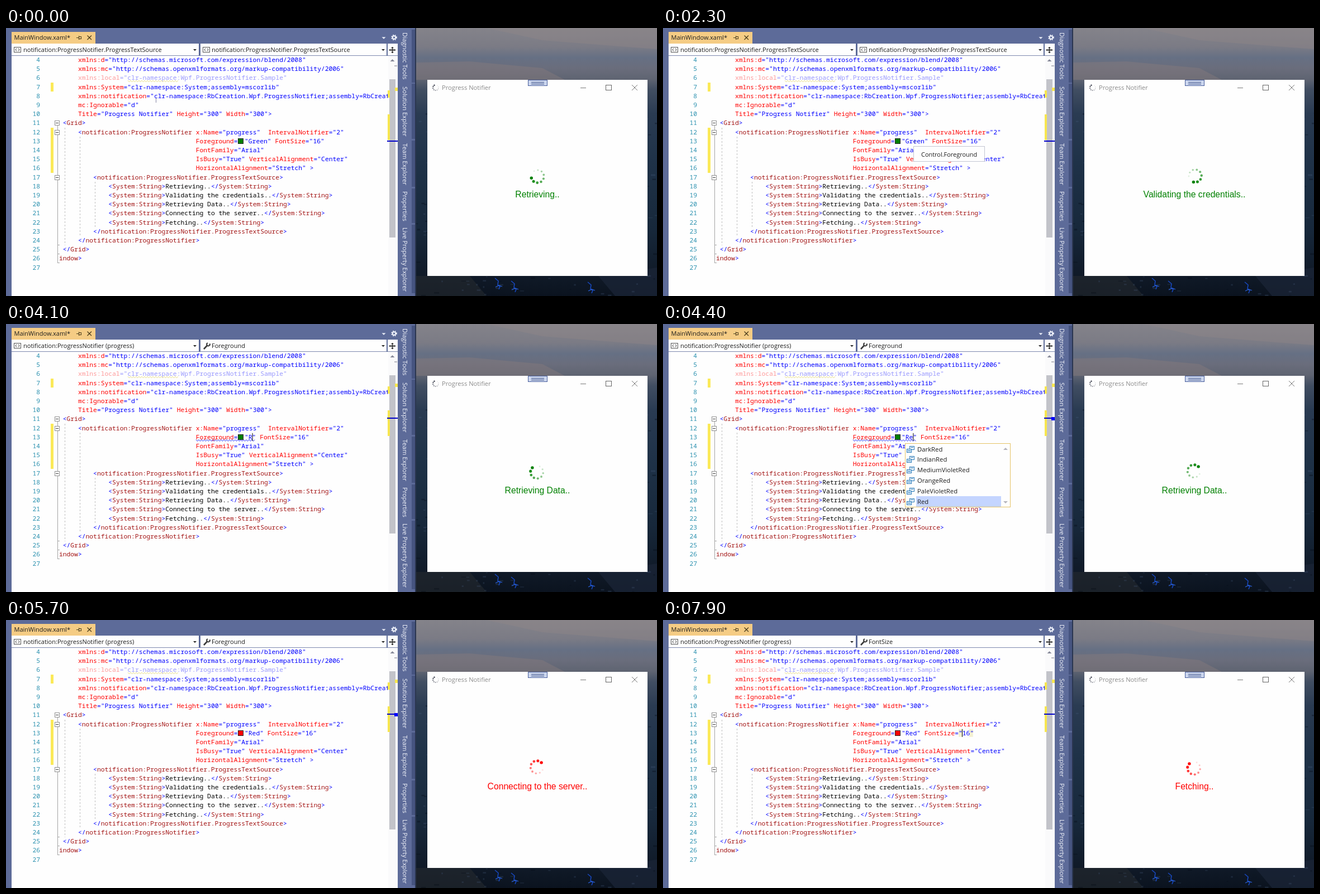
These frames come from a looping animation (1165x481 px, 8000 ms). An HTML page with a canvas:

```html
<!DOCTYPE html>
<html lang="en">
<head>
<meta charset="utf-8">
<title>Progress Notifier</title>
<style>
html, body { margin: 0; width: 100%; height: 100%; overflow: hidden; background: #5d6b99; }
canvas { display: block; width: 100vw; height: 100vh; }
</style>
</head>
<body>
<canvas id="stage"></canvas>
<script>
const W = 1165, H = 481, LOOP = 8000, TICK = 100;
const canvas = document.getElementById('stage');
const g = canvas.getContext('2d');
const dpr = window.devicePixelRatio || 1;
canvas.width = W * dpr;
canvas.height = H * dpr;

const UI = '"Open Sans", "Noto Sans", sans-serif';
const MONO = '11.333px "Noto Sans Mono", "DejaVu Sans Mono", monospace';
const SHELL = '#5d6b99', BLUE = '#0000ff', RED = '#ff0000', ELEMENT = '#a31515';
const CHAR = 6.8, LEFT = 74.5, LINE = 16.2, FIRST = 4;

const code = [
  [8, 'xmlns:d="http://schemas.microsoft.com/expression/blend/2008"'],
  [8, 'xmlns:mc="http://schemas.openxmlformats.org/markup-compatibility/2006"'],
  [8, 'xmlns:local="clr-namespace:Wpf.ProgressNotifier.Sample"'],
  [8, 'xmlns:System="clr-namespace:System;assembly=mscorlib"'],
  [8, 'xmlns:notification="clr-namespace:RbCreation.Wpf.ProgressNotifier;assembly=RbCreation.Wpf.ProgressNotifier"'],
  [8, 'mc:Ignorable="d"'],
  [8, 'Title="Progress Notifier" Height="300" Width="300">'],
  [4, '<Grid>'],
  [8, '<notification:ProgressNotifier x:Name="progress"  IntervalNotifier="2"'],
  [39, 'Foreground='],
  [39, 'FontFamily="Arial"'],
  [39, 'IsBusy="True" VerticalAlignment="Center"'],
  [39, 'HorizontalAlignment="Stretch" >'],
  [12, '<notification:ProgressNotifier.ProgressTextSource>'],
  [16, '<System:String>Retrieving..</System:String>'],
  [16, '<System:String>Validating the credentials..</System:String>'],
  [16, '<System:String>Retrieving Data..</System:String>'],
  [16, '<System:String>Connecting to the server..</System:String>'],
  [16, '<System:String>Fetching..</System:String>'],
  [12, '</notification:ProgressNotifier.ProgressTextSource>'],
  [8, '</notification:ProgressNotifier>'],
  [4, '</Grid>'],
  [0, '</Window>'],
  [0, '']
];
const messages = ['Retrieving..', 'Validating the credentials..', 'Retrieving Data..',
  'Connecting to the server..', 'Fetching..'];
const colours = ['DarkRed', 'IndianRed', 'MediumVioletRed', 'OrangeRed', 'PaleVioletRed', 'Red'];

// ---------- helpers ----------
function rect(x, y, w, h, fill) {
  g.fillStyle = fill;
  g.fillRect(x, y, w, h);
}
function frame(x, y, w, h, stroke, fill) {
  if (fill) rect(x, y, w, h, fill);
  g.strokeStyle = stroke;
  g.lineWidth = 1;
  g.strokeRect(x + 0.5, y + 0.5, w - 1, h - 1);
}
function path(points, stroke, width = 1) {
  g.beginPath();
  points.forEach(([x, y]) => g.lineTo(x, y));
  g.strokeStyle = stroke;
  g.lineWidth = width;
  g.stroke();
}
function poly(points, fill) {
  g.beginPath();
  points.forEach(([x, y]) => g.lineTo(x, y));
  g.fillStyle = fill;
  g.fill();
}
function dot(x, y, r, fill) {
  g.beginPath();
  g.arc(x, y, r, 0, Math.PI * 2);
  g.fillStyle = fill;
  g.fill();
}
function text(s, x, y, fill, font, align = 'left') {
  g.font = font;
  g.fillStyle = fill;
  g.textAlign = align;
  g.fillText(s, x, y);
}
function randomizer(seed) {
  return () => (seed = (seed * 16807) % 2147483647) / 2147483647;
}
const label = (s, x, y, fill = '#1e1e1e', size = 11) => text(s, x, y, fill, size + 'px ' + UI);
const down = (x, y, r, fill) => poly([[x - r, y - r / 2], [x + r, y - r / 2], [x, y + r / 2]], fill);
const up = (x, y, r, fill) => poly([[x - r, y + r / 2], [x + r, y + r / 2], [x, y - r / 2]], fill);
function squiggle(x0, x1, y, stroke) {
  const pts = [];
  for (let x = x0, i = 0; x <= x1; x += 2.5, i++) pts.push([x, y + (i % 2 ? 1.4 : -1.4)]);
  path(pts, stroke);
}
function vertical(x, y0, y1, dash) {
  g.setLineDash(dash || []);
  path([[x, y0], [x, y1]], dash ? '#bdbdbd' : '#a5a5a5');
  g.setLineDash([]);
}
const middle = n => 57 + (n - FIRST) * LINE;
const baseline = n => Math.round(middle(n) + 4);

// ---------- desktop and application window ----------
function wallpaper() {
  const sky = g.createLinearGradient(0, 0, 0, H);
  [[0, '#84838a'], [0.07, '#7b7b85'], [0.11, '#667084'], [0.15, '#6a6d7c'], [0.19, '#5f6472'],
    [0.23, '#414e62'], [0.32, '#2a3b52'], [0.5, '#1f3248'], [0.75, '#17283b'],
    [0.92, '#101a28'], [1, '#0b131f']]
    .forEach(([p, c]) => sky.addColorStop(p, c));
  rect(733, 0, 432, H, sky);
  poly([[733, 62], [830, 60], [960, 72], [1000, 93], [733, 93]], 'rgba(134,122,124,.45)');
  poly([[860, 0], [1165, 0], [1165, 38], [1060, 30], [960, 22]], 'rgba(146,136,134,.35)');
  poly([[733, 445], [830, 445], [860, 481], [733, 481]], 'rgba(38,42,48,.6)');
  poly([[1060, 445], [1165, 430], [1165, 481], [1090, 481]], 'rgba(28,38,56,.7)');

  const random = randomizer(29);
  for (let i = 0; i < 260; i++) {
    const x = 733 + 432 * random(), y = 150 + 331 * random(), w = 2 + 7 * random();
    rect(x, y, w, 1 + 2 * random(), i % 2 ? 'rgba(70,92,122,.28)' : 'rgba(4,10,20,.35)');
  }
  [[880, 459], [909, 464], [1046, 466]].forEach(([x, y]) => {
    path([[x - 5, y - 10], [x + 1, y - 5], [x, y + 2], [x + 4, y + 5], [x + 2, y + 10]], '#1747bd', 1.6);
    path([[x - 4, y + 6], [x + 2, y + 3], [x + 8, y + 5]], '#2a62dc', 1.2);
  });
}
function appWindow() {
  rect(754, 93, 394, 352, '#fefefe');
  for (let i = 0; i < 9; i++) {
    const a = (-120 - i * 36) * Math.PI / 180;
    dot(769 + 5 * Math.cos(a), 107 + 5 * Math.sin(a), 1.2 - i * 0.06, `rgba(40,44,60,${1 - i * 0.11})`);
  }
  label('Progress Notifier', 780, 111, '#8a8a8a', 11.2);
  frame(934, 93, 35, 11, '#4a5f9c', '#cbd6ee');
  path([[940, 97.5], [963, 97.5]], '#33477f');
  path([[940, 100.5], [963, 100.5]], '#33477f');
  path([[1028, 107.5], [1038, 107.5]], '#777');
  frame(1073, 102, 11, 10, '#666');
  path([[1120, 102], [1130, 112]], '#777');
  path([[1130, 102], [1120, 112]], '#777');
}
function notifier(t) {
  const red = t >= 5300;
  const n = t / TICK;
  const held = [18, 28, 38, 55, 67].filter(k => k <= n).length;
  const head = 165 + 30 * (n - held);
  const rad = d => d * Math.PI / 180;
  const cx = 951 + 1.4 * Math.cos(rad(head - 87)), cy = 265 + 1.4 * Math.sin(rad(head - 87));
  for (let i = 0; i < 9; i++) {
    const a = rad(head - i * 36);
    dot(cx + 11.4 * Math.cos(a), cy + 11.4 * Math.sin(a), 2.7 - i * 0.16,
      `rgba(${red ? '255,0,0' : '0,128,0'},${1 - i * 0.11})`);
  }
  const step = Math.floor((t + 400) / 2000);
  text(messages[step], 951, 303.5, red ? '#ff0000' : '#008000',
    '15.7px "Liberation Sans", Arial, sans-serif', 'center');
}

// ---------- editor shell ----------
function shell() {
  rect(0, 0, 732, H, SHELL);
  rect(732, 0, 2, H, '#2b3650');
  rect(10, 7, 150, 21, '#f5cc84');
  label('MainWindow.xaml*', 14.5, 21);
  path([[126, 17.5], [130, 17.5]], '#4a3c1c');
  path([[130.5, 14], [130.5, 21]], '#4a3c1c');
  frame(130, 15, 5, 5, '#4a3c1c');
  path([[145.5, 13.5], [153, 21]], '#4a3c1c', 1.3);
  path([[153, 13.5], [145.5, 21]], '#4a3c1c', 1.3);
  down(676, 18, 3.5, '#e8ecf7');
  g.setLineDash([1.8, 1.7]);
  g.beginPath();
  g.arc(694.5, 17, 4.3, 0, 7);
  g.strokeStyle = '#eef1fa';
  g.lineWidth = 2;
  g.stroke();
  g.setLineDash([]);
  g.beginPath();
  g.arc(694.5, 17, 2.8, 0, 7);
  g.stroke();

  rect(10, 28, 691, H - 28, '#fefefe');
  rect(10, 49, 691, 1, '#7d89ae');
  rect(345, 28, 3, 22, SHELL);
  rect(681, 28, 2, 22, SHELL);
  down(338, 39.5, 3, '#1e1e1e');
  down(675, 39.5, 3, '#1e1e1e');
  path([[685.5, 39.5], [697, 39.5]], '#1e1e1e', 2);
  path([[691.5, 34], [691.5, 45]], '#1e1e1e');
  up(691.5, 35, 2.6, '#1e1e1e');
  down(691.5, 44, 2.6, '#1e1e1e');

  const tabs = [['Diagnostic Tools', 8, 94], ['Solution Explorer', 105, 195], ['Team Explorer', 207, 281],
    ['Properties', 293, 346], ['Live Property Explorer', 358, 472]];
  tabs.forEach(([name, y0, y1]) => {
    rect(726, y0 - 5, 6, y1 - y0 + 9, '#465480');
    g.save();
    g.translate(710, y0);
    g.rotate(Math.PI / 2);
    label(name, 0, 0, '#f4f6fc', 11.2);
    g.restore();
  });
}
function tagIcon(x) {
  frame(x, 34, 13, 10, '#555');
  path([[x + 5, 36.5], [x + 3, 39], [x + 5, 41.5]], '#333');
  path([[x + 8, 36.5], [x + 10, 39], [x + 8, 41.5]], '#333');
}
function wrench() {
  path([[354, 45], [360, 38.5]], '#3b3b3b', 2.6);
  g.beginPath();
  g.arc(362, 36.5, 2.8, -0.5, 4.3);
  g.strokeStyle = '#3b3b3b';
  g.lineWidth = 2;
  g.stroke();
}
function navigation(t) {
  const moved = t >= 3900;
  const source = 'notification:ProgressNotifier.ProgressTextSource';
  tagIcon(14);
  label(moved ? 'notification:ProgressNotifier (progress)' : source, 31, 43);
  if (moved) wrench(); else tagIcon(352);
  label(moved ? (t >= 7800 ? 'FontSize' : 'Foreground') : source, 368, 43);
}
function scrollbar(t) {
  rect(684, 50, 16, H - 50, '#fafafb');
  up(691.5, 58, 4, '#868999');
  rect(686, 92, 11, 284, '#c2c3c9');
  rect(695, 67, 5, 2, '#b8b8c0');
  const mark = '#f7e64f';
  rect(683, 112, 4, 13, mark);
  rect(696, 107, 5, 6, mark);
  rect(683, 155, 4, 46, mark);
  rect(682, t < 3000 ? 202 : 168, 19, 2, '#0000c8');
  if (t >= 4400 && t < 6300) rect(695, 167, 6, 6, BLUE);
}

// ---------- code ----------
function markup(s, x, y, faded) {
  let mode = 'attr';
  for (const part of s.match(/<\/?|>|"[^"]*"?|=|[^\s<>="]+|\s+/g) || []) {
    let fill = mode === 'el' ? ELEMENT : mode === 'text' ? '#000' : RED;
    if (/^[<>="]/.test(part)) fill = BLUE;
    g.globalAlpha = faded ? 0.4 : 1;
    text(part, x, y, fill, MONO);
    x += part.length * CHAR;
    if (part[0] === '<') mode = 'el';
    else if (part === '>') mode = 'text';
    else if (mode === 'el') mode = 'attr';
  }
  g.globalAlpha = 1;
}
function listing() {
  rect(80, 98, 5, 16, '#fbe958');
  rect(80, 179, 5, 81, '#fbe958');
  vertical(105.5, 179, 390, [3, 3]);
  vertical(132.5, 195, 374, [3, 3]);
  vertical(159.5, 276, 357, [3, 3]);
  vertical(92.5, 175, 422);
  [389, 405, 421].forEach(y => path([[92, y + 0.5], [96, y + 0.5]], '#a5a5a5'));
  [11, 12, 17].forEach(n => {
    const y = Math.round(middle(n)) - 4;
    frame(87, y, 9, 9, '#909090', '#fefefe');
    path([[89, y + 4.5], [94, y + 4.5]], '#444');
  });
  g.save();
  g.beginPath();
  g.rect(10, 50, 673, H - 50);
  g.clip();
  code.forEach(([col, s], i) => {
    const n = FIRST + i, y = baseline(n);
    text(n, 61, y, '#2b91af', MONO, 'right');
    if (s === '</Window>') {
      text('indow', LEFT + 3 * CHAR, y, ELEMENT, MONO);
      text('>', LEFT + 8 * CHAR, y, BLUE, MONO);
    } else markup(s, LEFT + col * CHAR, y, n === 6);
  });
  g.restore();
  squiggle(218, 308, 95.5, '#eadf86');
}
function foregroundValue(t) {
  if (t < 3900) return 'Green';
  if (t < 4000) return '';
  return 'Red'.slice(0, t < 4300 ? 1 : t < 4500 ? 2 : 3);
}
function editedLine(t) {
  const y = middle(13), x = 427, value = foregroundValue(t);
  const end = x + (value.length + 2) * CHAR;
  if (t >= 3000 && t < 3900) rect(x + CHAR, y - 8, 5 * CHAR, 16, '#a9cdf0');
  if (t >= 7400) {
    rect(529, y - 7, CHAR, 14, '#f3f0d2');
    rect(548, y - 7, CHAR, 14, '#f3f0d2');
  }
  frame(415, 198, 10, 10, '#222', t < 4600 ? '#008000' : '#ff0000');
  markup(`"${value}" FontSize="16"`, x, baseline(13));
  if (t >= 4000 && t < 5600) squiggle(340, end, 209, '#3038ff');

  const since = t >= 7400 ? t - 7400 : t - 5100;
  if (t >= 3900 && t < 4700) rect(end - CHAR, y - 7, 1, 14, '#000');
  else if (t >= 5100 && Math.floor(since / 530) % 2 === 0) {
    rect(t >= 7400 ? 535 : 460, y - 7, 1, 14, '#000');
  }
}
function pointer(t) {
  if (t >= 2700) return;
  const p = Math.min(1, Math.max(0, (t - 100) / 800));
  const e = p * p * (3 - 2 * p);
  const x = Math.round(268 + 182 * e), y = Math.round(130 + 74 * e);
  rect(x, y - 4, 1, 8, 'rgba(40,40,90,.55)');
}
function tooltip(t) {
  if (t < 1100 || t >= 2600) return;
  frame(448, 212, 128, 28, '#c3c6d2', '#fefefe');
  label('Control.Foreground', 462, 231, '#1e1e1e', 10.95);
}
function completions(t) {
  if (t < 4300 || t >= 5000) return;
  frame(433, 214, 189, 115, '#e5c365', '#fefefe');
  rect(453, 309, 152, 19, '#c4d5ff');
  colours.forEach((name, i) => {
    const y = 224.5 + i * 18.85, top = Math.round(y);
    frame(441, top - 6, 9, 7, '#2a7ab8', '#fefefe');
    frame(436, top - 1, 9, 7, '#2a7ab8', '#d5e8f6');
    path([[438, top + 2.5], [443, top + 2.5]], '#2a7ab8');
    path([[443, top - 3.5], [448, top - 3.5]], '#2a7ab8');
    label(name, 455, Math.round(y + 4), '#1e1e1e', 11.3);
  });
  up(613, 224, 4, '#b4b4bc');
  down(613, 320, 4, '#b4b4bc');
}

function draw(t) {
  g.setTransform(dpr, 0, 0, dpr, 0, 0);
  wallpaper();
  appWindow();
  notifier(t);
  shell();
  navigation(t);
  scrollbar(t);
  listing();
  editedLine(t);
  tooltip(t);
  pointer(t);
  completions(t);
}

const start = performance.now();
let last = -1;
function loop() {
  const t = Math.floor(((performance.now() - start) % LOOP) / TICK) * TICK;
  if (t !== last) draw(last = t);
  requestAnimationFrame(loop);
}
loop();
</script>
</body>
</html>
```
